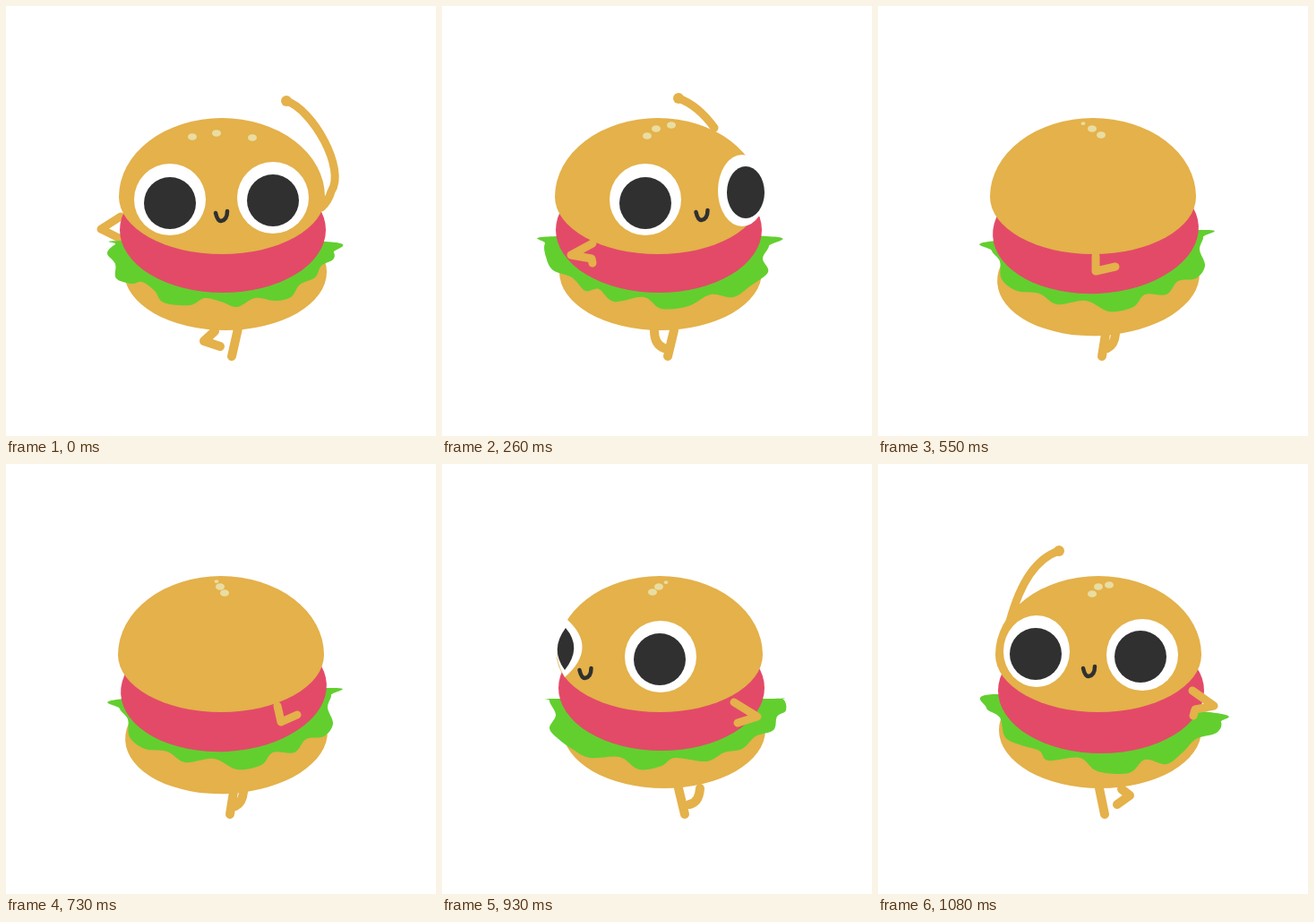
Recreate the animation shown at these times as an HTML page with a canvas. Size 480 px wide and 480 px high, loop 1230 ms.

```html
<!DOCTYPE html>
<html>
<head>
<meta charset="utf-8">
<style>
html, body { margin: 0; height: 100%; overflow: hidden; background: #fff; }
canvas { display: block; width: 100vmin; height: 100vmin; }
</style>
</head>
<body>
<canvas id="stage" width="480" height="480"></canvas>
<script>
const c = document.getElementById('stage').getContext('2d');
const BUN = '#e4b14a', PATTY = '#e34a68', LEAF = '#62cf2f', INK = '#303030', SEED = '#e9dda2';
c.lineCap = c.lineJoin = 'round';

function oval(x, y, rx, ry, color, tilt = 0) {
  c.fillStyle = color;
  c.beginPath();
  c.ellipse(x, y, rx, ry, tilt, 0, 7);
  c.fill();
}

function line(d, width, color = BUN) {
  c.strokeStyle = color;
  c.lineWidth = width;
  c.stroke(new Path2D(d));
}

function shape(d, color) {
  c.fillStyle = color;
  c.fill(new Path2D(d));
}

// Closed smooth curve through the points
function blob(text, color) {
  const p = text.split(' ').map(s => s.split(',').map(Number));
  const at = i => p[(i + p.length) % p.length];
  c.fillStyle = color;
  c.beginPath();
  c.moveTo(...p[0]);
  p.forEach((b, i) => {
    const a = at(i - 1), d = at(i + 1), e = at(i + 2);
    c.bezierCurveTo(b[0] + (d[0] - a[0]) / 6, b[1] + (d[1] - a[1]) / 6,
                    d[0] - (e[0] - b[0]) / 6, d[1] - (e[1] - b[1]) / 6, ...d);
  });
  c.fill();
}

const smile = (x, y) => `M${x - 6.5} ${y - 4}q2 9 6 9q7-1 7-11`;

// Body parts are centres; eyes are [x, y, rx, pupil x, pupil y, pupil rx]
const front = {
  ms: 150, bun: 241, patty: [242, 250], base: [245, 297],
  leaf: '135,262 122,266 113,276 122,288 123,304 140,310 152,308 166,318 176,331 205,334 222,326 240,330 258,336 278,326 300,329 318,325 328,311 345,303 352,290 365,283 366,275 357,263',
  back: 'M313 106C342 115 380 182 363 207Q360 218 352 225M128 235L106 249L128 260', hand: [313, 106],
  legs: 'M259 360L252 391M233 363L221 374L239 380',
  seeds: [[208, 146], [235, 142], [275, 147]],
  eyes: [[183, 216, 40, 183, 220, 29], [298, 214, 40, 298, 217, 29]],
  mouth: smile(240.5, 235)
};

const turn = {
  ms: 110, bun: 241, patty: [242, 251], base: [244, 297],
  leaf: '128,264 115,275 117,290 133,296 148,314 165,318 178,328 203,320 214,335 240,337 258,327 282,323 298,325 320,311 338,306 356,302 357,280 370,274 377,263 360,247',
  arms: 'M303 97C338 115 366 167 353 212M155 262L130 273L150 275L152 281', hand: [303, 97],
  legs: 'M259 360L252 391M239 364L224 370L238 380',
  seeds: [[222, 145], [239, 137], [265, 135]],
  eyes: [[207, 215, 40, 207, 219, 29], [318, 206, 37, 321, 209, 29]],
  mouth: smile(267.5, 233)
};

const side = {
  ms: 40, bun: 241, patty: [242, 250], base: [244, 297],
  leaf: '128,257 115,265 116,280 124,295 145,303 160,318 175,316 192,330 225,325 245,338 275,335 300,322 325,325 345,312 364,297 358,282 365,268 362,257',
  arms: 'M182 267L158 282L181 287L182 292',
  legs: 'M259 362L252 391M237 362Q237 378 248 382',
  gap: 'M249 365V370',
  seeds: [[235, 145], [239, 137], [247, 132, 2.5]],
  eyes: [[246, 217, 40, 246, 220, 29]],
  lens: ['M350 173Q314 205 352 238Q370 207 350 173', 'M352 183Q332 205 352 230Q369 207 352 183'],
  mouth: smile(312, 234)
};

const behind = {
  ms: 100, bun: 240, patty: [243, 251], base: [246, 303], tilt: -.05,
  leaf: '132,262 127,273 136,285 138,305 155,318 180,321 200,333 232,329 258,341 285,336 298,322 322,322 335,307 355,304 365,290 359,272 363,258 357,250',
  arms: 'M243 279V296L265 291',
  legs: 'M254 366L250 391M265 366Q264 378 256 382',
  seeds: [[249, 144], [239, 137], [229, 131, 2.5]]
};

const blink = {
  ms: 100, bun: 240, patty: [242, 250], base: [246, 297],
  leaf: '127,259 119,270 128,285 132,308 150,317 175,321 195,334 225,329 248,341 275,336 285,321 315,322 328,310 355,306 362,290 361,282 370,273 358,260',
  arms: 'M132 265L158 259',
  legs: 'M257 361L250 391M239 362Q238 378 247 386M247 362L248 380',
  seeds: [[224, 141], [239, 137], [250, 132, 2.5]],
  eyes: [[217, 210, 40]],
  lid: 'M180 209Q217 238 254 203',
  mouth: 'M128 222Q135 223 136 214'
};

const back = {
  ms: 110, bun: 245, patty: [247, 250], base: [250, 297],
  leaf: '132,262 120,264 127,280 120,295 130,307 145,318 165,328 198,327 220,341 245,337 260,328 295,332 315,322 335,318 350,304 370,297 374,282 384,275 380,262 358,262',
  back: 'M239 101Q219 108 200 135', hand: [239, 101],
  arms: 'M341 264L367 281L346 286L344 291',
  legs: 'M264 362L271 391M288 362Q287 378 276 380',
  gap: 'M274 363V370',
  seeds: [[243, 145], [245, 137], [249, 132, 2.5]],
  eyes: [[265, 217, 40, 264, 219, 29]],
  lens: ['M140 168C179 172 178 238 135 244Q104 208 140 168', 'M138 181Q114 208 135 237C165 232 166 190 138 181'],
  mouth: smile(185, 235)
};

const end = {
  ms: 150, bun: 246, patty: [249, 253], base: [248, 297],
  leaf: '138,257 121,272 136,283 142,305 160,314 180,320 190,331 225,328 245,343 280,345 298,330 322,335 340,322 355,307 378,300 383,288 370,277',
  arms: 'M202 97Q165 109 147 176M351 253L375 270L354 274L352 281', hand: [202, 97],
  legs: 'M247 362L253 391M272 363L281 370L267 380',
  seeds: [[239, 145], [246, 137], [258, 135]],
  eyes: [[177, 209, 37, 176, 212, 29], [295, 213, 40, 293, 215, 29]],
  mouth: smile(235.5, 232)
};

const poses = [
  front,
  turn,
  { ...side, ms: 150, back: 'M264 103Q286 111 304 136', hand: [264, 103],
    arms: 'M168 265L144 278L167 282L168 287',
    seeds: [[229, 145], [239, 137], [256, 133]], lens: null,
    eyes: [[227, 216, 40, 227, 220, 29], [335, 206, 27, 339, 208, 21]], mouth: smile(290, 234) },
  side,
  { ...side, ms: 100, arms: 'M212 275L195 290L221 293', gap: '', lens: null,
    legs: 'M259 362L251 391M245 362Q243 378 250 386',
    eyes: [[280, 213, 40]], lid: 'M243 206Q280 241 317 212', mouth: 'M345 215Q345 225 352 223' },
  behind,
  { ...behind, ms: 90, arms: 'M303 270L307 288L325 280', seeds: [[244, 144], [239, 137], [235, 131, 2.5]] },
  { ...behind, ms: 90, arms: 'M342 258L350 272L342 277', leaf: blink.leaf, base: blink.base,
    seeds: [[233, 143], [239, 137], [243, 131, 2.5]] },
  blink,
  { ...back, ms: 40, bun: 243, patty: [245, 250], base: [248, 297], back: '', hand: null,
    arms: 'M326 266L352 282L330 289', seeds: [[235, 143], [242, 137], [250, 132, 2.5]],
    eyes: [[244, 215, 40, 243, 218, 29]],
    lens: ['M139 173Q175 205 137 238Q118 207 139 173', 'M138 183Q157 205 137 230Q120 207 138 183'],
    mouth: smile(160, 234) },
  back,
  end
];
const loop = poses.reduce((sum, p) => sum + p.ms, 0);

function draw(p) {
  c.fillStyle = '#fff';
  c.fillRect(0, 0, 480, 480);
  if (p.back) line(p.back, 9);
  if (p.hand) oval(...p.hand, 6, 6, BUN);
  line(p.legs, 10);
  if (p.gap) line(p.gap, 3, '#fff');
  oval(...p.base, 113, 65, BUN, p.tilt);
  blob(p.leaf, LEAF);
  oval(...p.patty, 115, 70, PATTY, p.tilt);
  c.fillStyle = BUN;
  c.beginPath();
  c.ellipse(p.bun, 213, 115, 88, 0, Math.PI, 0);
  c.ellipse(p.bun, 213, 115, 64, 0, 0, Math.PI);
  c.fill();
  for (const [x, y, r = 5] of p.seeds) oval(x, y, r, r * .75, SEED);
  for (const [x, y, rx, px, py, pr] of p.eyes || []) {
    oval(x, y, rx, 40, '#fff');
    if (pr) oval(px, py, pr, 29, INK);
  }
  if (p.lens) p.lens.forEach((d, i) => shape(d, i ? INK : '#fff'));
  if (p.lid) line(p.lid, 6, INK);
  if (p.mouth) line(p.mouth, 4.5, INK);
  if (p.arms) line(p.arms, 9);
}

function tick() {
  let t = performance.now() % loop, i = 0;
  while (t >= poses[i].ms) t -= poses[i++].ms;
  draw(poses[i]);
  requestAnimationFrame(tick);
}
tick();
</script>
</body>
</html>
```
